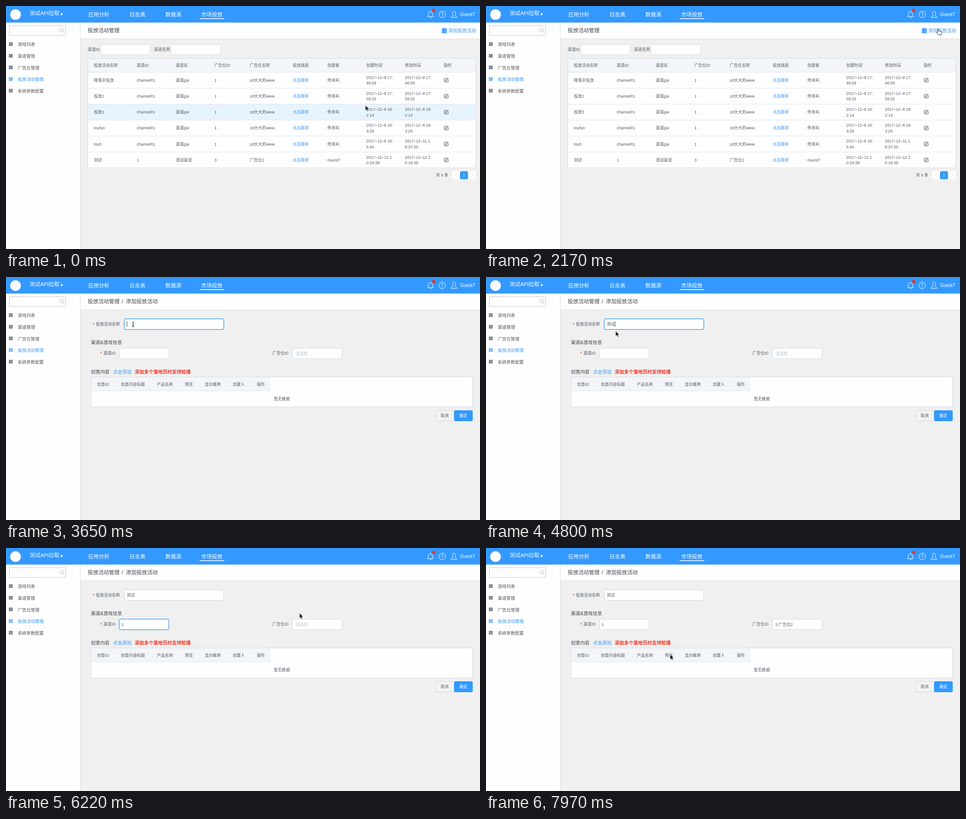
Write an HTML page that moves like this. It is 1044 px wide and 536 px high and loops after 8 s.

```html
<!DOCTYPE html>
<html lang="zh-CN">
<head>
<meta charset="utf-8">
<title>投放活动管理</title>
<style>
html, body { margin: 0; width: 100%; height: 100%; overflow: hidden; background: #f0f0f0; }
svg { display: block; width: 100%; height: 100%; font-family: "Liberation Sans", "Noto Sans CJK SC", "Noto Sans CJK", sans-serif; }
text { white-space: pre; }
.line { fill: none; stroke: currentColor; stroke-linecap: round; stroke-linejoin: round; }
#cursor { animation: travel 8s ease-in-out infinite; }
@keyframes travel {
  0%, 5.875% { transform: translate(791.5px, 219px); }
  14.875% { transform: translate(868px, 87px); }
  17.125% { transform: translate(867.5px, 84.5px); }
  22.6% { transform: translate(996px, 51px); }
  31.6% { transform: translate(995.5px, 50.5px); }
  33.9%, 35% { transform: translate(977px, 51px); }
  43.5%, 45.7% { transform: translate(280px, 104.5px); }
  48%, 60.1% { transform: translate(285.5px, 119px); }
  65.5%, 72.6% { transform: translate(268px, 167px); }
  77.75% { transform: translate(646.5px, 143.5px); }
  80.5%, 83% { transform: translate(690px, 165px); }
  87%, 93.2% { transform: translate(680px, 250px); }
  99.6%, 100% { transform: translate(405.5px, 234.5px); }
}
</style>
</head>
<body>
<svg id="stage" viewBox="0 0 1044 536"></svg>
<script>
const LOOP = 8000;
const BLUE = '#3399ff', INK = '#555b66', DARK = '#3f444d', RED = '#ee3322', LINE = '#dce3e9', WHITE = '#fefefe';

// y is the optical centre of the line.
const text = (x, y, str, size = 8.8, fill = INK, extra = '') =>
  `<text x="${x}" y="${(y + size * 0.36).toFixed(2)}" font-size="${size}" fill="${fill}" ${extra}>${str}</text>`;
const rect = (x, y, w, h, fill, extra = '') =>
  `<rect x="${x}" y="${y}" width="${w}" height="${h}" fill="${fill}" ${extra}/>`;
const path = (d, color, width = 1, extra = '') =>
  `<path class="line" d="${d}" color="${color}" stroke-width="${width}" ${extra}/>`;
const group = (x, y, body) => `<g transform="translate(${x} ${y})">${body}</g>`;
// Visible only inside the given "from-to" windows in ms; a fade must be shorter than its window.
const during = (windows, body, fade = 0) => `<g data-show="${windows}" data-fade="${fade}">${body}</g>`;

const MEDIUM = 'font-weight="500"', BOLD = 'font-weight="700"';
const input = (x, y, w) => rect(x + .5, y + .5, w - 1, 23, WHITE, 'stroke="#d3d8dd" rx="2.5"');
const focusRing = (x, y, w) =>
  rect(x - .5, y - .5, w + 1, 25, 'none', `stroke="${BLUE}" stroke-opacity=".3" rx="3.5"`) +
  rect(x + .5, y + .5, w - 1, 23, 'none', `stroke="${BLUE}" rx="2.5"`);
const caret = (x, y) => rect(x, y - 6, .9, 12, '#333');

function header() {
  const nav = [[181, '应用分析'], [272, '日志表'], [351, '数据源'], [430, '市场投放']];
  return rect(0, 0, 1044, 36.5, BLUE) +
    `<circle cx="21" cy="19" r="11.8" fill="${WHITE}"/>` +
    text(52, 16, '测试API拉取', 11.7, '#fff', MEDIUM) +
    '<path d="M121.5 14.2 125.5 17.8 121.5 21.4Z" fill="#fff"/>' +
    nav.map(([x, label]) => text(x, 18.5, label, 11.7, '#fff', MEDIUM)).join('') +
    rect(426.5, 27, 54.5, 1.6, '#fff') +
    path('M928.5 23.3H941.5C939.6 21.7 939.7 20 939.7 17.5 939.7 11 930.3 11 930.3 17.5 930.3 20 930.4 21.7 928.5 23.3ZM933.5 25.3H936.5M935 12.3V11.3', '#fff') +
    `<circle cx="942.2" cy="9.8" r="3.6" fill="${RED}"/>` +
    '<circle cx="960.8" cy="18.5" r="7.2" fill="none" stroke="#fff"/>' +
    path('M958.6 16.6C958.8 13.6 963 13.8 963 16.5 963 18.2 960.8 18.2 960.8 20.3M960.8 22.3V22.5', '#fff') +
    path('M980.5 24.8C980.5 21.6 984.5 22 985 20.3 981.8 17 983.3 11.8 986.8 11.8 990.3 11.8 991.8 17 988.6 20.3 989.1 22 993.1 21.6 993.1 24.8Z', '#fff') +
    text(1000, 18.5, 'Guest7', 10.27, '#fff');
}

function sidebar() {
  const items = ['游戏列表', '渠道管理', '广告位管理', '投放活动管理', '系统参数配置'];
  const menu = items.map((label, i) => {
    const y = 85 + i * 25.65, active = i === 3;
    const grid = rect(6.5, y - 4.7, 8, 7.6, active ? BLUE : '#444d59') +
      path(`M9.2 ${y - 4.7}v7.6M11.9 ${y - 4.7}v7.6M6.5 ${y - 2.2}h8M6.5 ${y + .4}h8`, WHITE, .6);
    return grid + text(26, y, label, 9.53, active ? BLUE : '#555');
  }).join('');
  return rect(0, 36.5, 163, 500, WHITE) + rect(163, 36.5, 1, 500, '#dcdcdc') +
    rect(7.5, 43.5, 124, 21.5, WHITE, 'stroke="#c9c9c9"') +
    '<circle cx="122.3" cy="53.2" r="4" fill="none" stroke="#bbb"/>' + path('M125.2 56.2 128 59.2', '#bbb') + menu;
}

const titleBar = () =>
  rect(164, 36.5, 880, 35.5, WHITE) + rect(164, 72, 880, 1, '#dedede') +
  text(180, 54, '投放活动管理', 11.7, DARK, MEDIUM);

const COLUMNS = [193.5, 288, 374, 459, 537, 631.5, 708, 793.5, 878.5, 964];
const ROW_TOP = 146, ROW_H = 35.2;

function listPage() {
  const titles = ['投放活动名称', '渠道ID', '渠道名', '广告位ID', '广告位名称', '投放链接', '创建者', '创建时间', '修改时间', '操作'];
  const usual = ['channel01', '渠道gai', '1', 'zd大大的www', '点击跳转', '佟禾屿'];
  const rows = [
    ['降落伞投放', ...usual, '2017–12–8 17:|46:59', '2017–12–8 17:|46:59'],
    ['投放2', ...usual, '2017–12–8 17:|58:32', '2017–12–8 17:|58:32'],
    ['投放3', ...usual, '2017–12–8 18:|2:14', '2017–12–8 18:|2:14'],
    ['toufan', ...usual, '2017–12–8 18:|3:29', '2017–12–8 18:|3:29'],
    ['tou5', ...usual, '2017–12–8 18:|5:34', '2017–12–11 1|5:37:35'],
    ['测试', '1', '测试渠道', '3', '广告位2', '点击跳转', 'Guest7', '2017–12–12 2|0:18:38', '2017–12–12 2|0:18:38']
  ];
  const hovers = { 0: '830-960', 1: '660-830', 2: '0-660' };
  const cell = (value, col, y) => {
    const [first, second] = value.split('|');
    return second
      ? text(COLUMNS[col], y - 6.2, first) + text(COLUMNS[col], y + 6.4, second)
      : text(COLUMNS[col], y, value, 8.8, col === 5 ? BLUE : INK);
  };
  const pencil = path('M4.3-.6V3.2Q4.3 4.2 3.3 4.2H-3.2Q-4.2 4.2-4.2 3.2V-3Q-4.2-4 -3.2-4H.8M-1.5 1.6-1 -.4 3.4-4.6 4.8-3.2.4 1.1Z', '#444');
  const body = rows.map((row, i) => {
    const top = ROW_TOP + i * ROW_H, y = top + 17.6;
    return (hovers[i] ? during(hovers[i], rect(180.5, top, 854, ROW_H, '#e8f4fd'), 120) : '') +
      rect(180, top - .5, 855, 1, LINE) +
      row.map((value, col) => cell(value, col, y)).join('') + group(969.5, y, pencil);
  }).join('');
  const database = [0, 3.6, 7.2].map(dy =>
    `<path d="M959.8 ${50.2 + dy}C959.8 48.4 971 48.4 971 ${50.2 + dy}V${51.6 + dy}C971 ${53.6 + dy} 959.8 ${53.6 + dy} 959.8 ${51.6 + dy}Z" fill="${BLUE}" stroke="${WHITE}" stroke-width=".5"/>`).reverse().join('');
  return database + text(974, 54.5, '添加投放活动', 10.27, BLUE) +
    text(180, 96, '渠道ID') + input(208, 84, 110) + text(326, 96, '渠道名称') + input(363, 84, 110) +
    rect(180, 115.5, 855, 241.5, WHITE) + rect(180, 115.5, 855, 30, '#f3f5f8') +
    titles.map((title, i) => text(COLUMNS[i], 131, title)).join('') + body +
    rect(180, 115.5, 855, 241.5, 'none', 'stroke="#d5dde4"') +
    text(947, 373.3, '共 6 条') + rect(982, 364.5, 53, 17.5, WHITE, 'rx="2"') +
    rect(1000, 364.5, 17.5, 17.5, BLUE, 'rx="2"') +
    text(1008.7, 373.3, '1', 8.8, '#fff', 'text-anchor="middle"') +
    path('M992.8 369.8 989.6 373.3 992.8 376.8M1024.8 369.8 1028 373.3 1024.8 376.8', '#ccd2d8', .9);
}

function dropdown() {
  const options = ['1:zd大大的www', '2:广告位1', '3:广告位2'];
  return rect(631.5, 184.5, 109, 80, WHITE, 'stroke="#d3d8dd" rx="2" style="filter:drop-shadow(0 2px 2px #0002)"') +
    during('6930-7500', rect(632, 236.5, 108, 24, '#e8edf4')) +
    options.map((label, i) => text(638, 200.5 + i * 24, label)).join('');
}

function formPage() {
  const columns = [[200.5, '创意ID'], [253, '创意内容标题'], [332.5, '产品名称'], [394, '预览'], [438, '显示概率'], [499.5, '创建人'], [552.5, '操作']];
  const star = (x, y) => text(x, y + 1, '*', 10, RED);
  return text(254.8, 54, '/', 11.7, DARK, MEDIUM) + text(264, 54, '添加投放活动', 11.7, DARK, MEDIUM) +
    star(191, 104) + text(198, 103.5, '投放活动名称') + input(260, 92, 220) +
    text(187, 144.5, '渠道&amp;游戏信息', 10.27, DARK, MEDIUM) +
    star(207, 168) + text(215, 168, '渠道ID') + input(249, 156.5, 110) +
    text(587, 168, '广告位ID') + input(630.5, 156.5, 110) +
    text(187, 209, '创意内容', 10.27, DARK, MEDIUM) + text(235.5, 209, '点击添加', 10.27, BLUE) +
    text(283.5, 209, '添加多个落地页时支持轮播', 10.27, RED, BOLD) +
    rect(187.5, 220.5, 840, 66, WHITE, 'stroke="#d5dde4"') + rect(188, 221, 395, 29.5, '#f3f5f8') + rect(188, 250.5, 395, 1, LINE) +
    columns.map(([x, label]) => text(x, 236.5, label)).join('') + text(590, 268.7, '暂无数据') +
    rect(946.5, 294.5, 40, 23, '#f3f3f3', 'stroke="#d0d4d8" rx="2.5"') + text(957.5, 306, '取消') +
    rect(987, 294, 41, 24, BLUE, 'rx="3"') + text(998.5, 306, '确定', 8.8, '#fff') +
    during('3560-5330', focusRing(260, 92, 220), 90) +
    during('3560-3740', caret(266, 104)) +
    during('3830-4090', text(266, 104, 'c')) +
    during('4090-4270', text(266, 104, 'ce')) +
    during('4270-4530', text(266, 104, 'ce shi')) +
    during('4530-8000', text(266, 104, '测试')) +
    during('4530-5060', caret(283.8, 104)) +
    during('5330-6620', focusRing(249, 156.5, 110), 90) +
    during('5410-5860', caret(255, 168.5)) +
    during('5860-8000', text(254.5, 168.5, '1')) +
    during('5860-6130', caret(260, 168.5)) +
    during('6580-7500', focusRing(630.5, 156.5, 110), 90) +
    during('0-7500', text(638, 168.5, '请选择', 8.8, '#bcc3d0')) +
    during('7500-8000', text(637, 168.5, '3:广告位2')) +
    during('6620-7500', dropdown(), 150);
}

function cursor() {
  const arrow = '<path d="M0 0V11.6L2.6 9.2 4.4 13.2 6.4 12.3 4.7 8.5H8.2Z" fill="#111" stroke="#fff" stroke-width=".7"/>';
  const hand = '<path d="M-1.2 0Q0-1.2 1.2 0V4.6L2.6 4.3 3.6 5 5 4.7 6 5.6 7.6 5.6 8.2 7 7 13H.6L-3.6 7.6Q-3.4 6-1.2 7.6Z" fill="#fff" stroke="#111" stroke-width=".9"/>';
  const beam = path('M-2-5Q0-5 0-3.5 0-5 2-5M0-3.5V4M-2 5.2Q0 5.2 0 3.7 0 5.2 2 5.2M-1.2 1.8H1.2', '#111');
  return `<g id="cursor">${during('0-1710,2440-3380,3740-5140,5860-6380,7590-8000', arrow)}` +
    `${during('1710-2440,6380-7590', hand)}${during('3380-3740,5140-5860', beam)}</g>`;
}

function schedule(el) {
  const fade = +el.dataset.fade / LOOP;
  const frames = [];
  const step = (offset, opacity, easing = 'step-end') => frames.push({ offset, opacity, easing });
  const turn = (offset, opacity) => {
    if (!fade) return step(offset, opacity);
    step(offset, 1 - opacity, 'linear');
    step(offset + fade, opacity);
  };
  const windows = el.dataset.show.split(',').map(w => w.split('-').map(ms => ms / LOOP));
  step(0, windows[0][0] === 0 ? 1 : 0);
  for (const [from, to] of windows) {
    if (from > 0) turn(from, 1);
    if (to < 1) turn(to, 0);
  }
  step(1, frames.at(-1).opacity);
  el.animate(frames, { duration: LOOP, iterations: Infinity });
}

const stage = document.getElementById('stage');
stage.innerHTML = rect(0, 0, 1044, 536, '#f0f0f0') + titleBar() + sidebar() + header() +
  during('0-2440', listPage()) + during('2440-8000', formPage()) + cursor();
stage.querySelectorAll('[data-show]').forEach(schedule);
</script>
</body>
</html>
```
